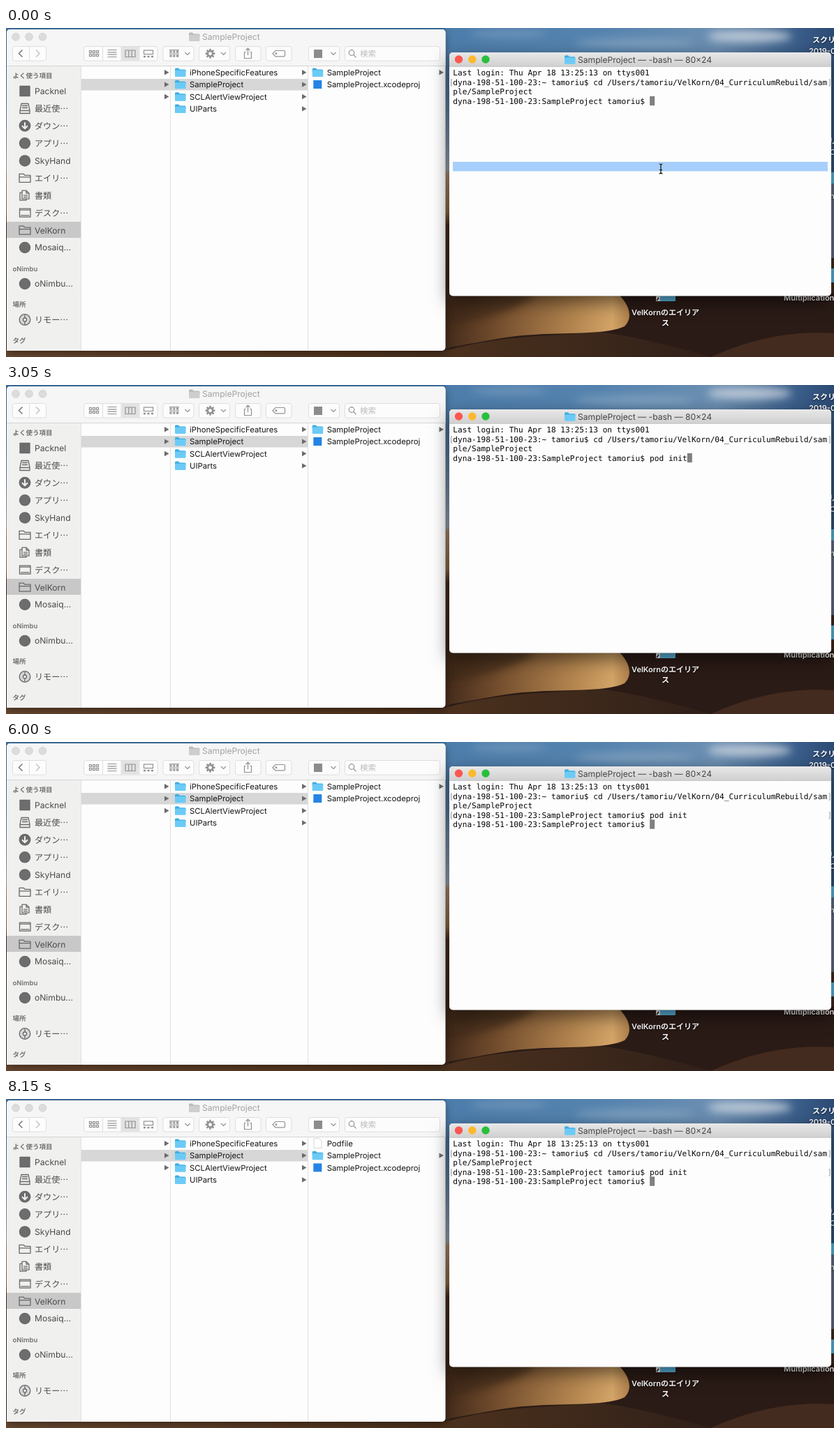
Animation, 1186 px wide and 472 px high, one loop 8.2 s. Source, as an HTML page:

```html
<!DOCTYPE html>
<html lang="ja">
<head>
<meta charset="utf-8">
<title>pod init</title>
<style>
html, body { margin: 0; width: 100%; height: 100%; overflow: hidden; background: #2b1b16; }
svg { display: block; width: 1186px; height: 472px; }
text { font-family: Inter, "Noto Sans CJK JP", "Noto Sans CJK", "DejaVu Sans", sans-serif;
  text-rendering: geometricPrecision; white-space: pre; }
.mono text { font-family: "DejaVu Sans Mono", monospace; font-size: 11.146px; fill: #050505; }
.side text { font-size: 12.1px; fill: #4b4b4b; }
.side .head { font-size: 9.5px; font-weight: 600; fill: #727272; }
.cols text { font-size: 11.3px; fill: #161616; }
.desk text { font-size: 11px; font-weight: 600; fill: #fff; filter: drop-shadow(0 1px 1px #000a); }
.icon { fill: none; stroke: #686868; stroke-width: 1.3; stroke-linejoin: round; }
.tool { fill: none; stroke: #929292; stroke-width: 1.2; }
</style>
</head>
<body>
<svg id="stage" viewBox="0 0 1186 472">
<defs>
  <linearGradient id="land" x2="0" y2="1">
    <stop offset="0" stop-color="#41709f"/><stop offset=".2" stop-color="#5c83aa"/>
    <stop offset=".43" stop-color="#a3b0bd"/><stop offset=".445" stop-color="#b59172"/>
    <stop offset=".56" stop-color="#9a7049"/><stop offset=".6" stop-color="#4a3020"/>
    <stop offset="1" stop-color="#38241a"/>
  </linearGradient>
  <linearGradient id="sky">
    <stop offset="0" stop-color="#4d7dab"/><stop offset=".4" stop-color="#5583ae"/>
    <stop offset=".7" stop-color="#6c8fb2"/><stop offset=".9" stop-color="#3b5f8b"/>
    <stop offset="1" stop-color="#2c4a73"/>
  </linearGradient>
  <linearGradient id="dune" x1="630" x2="895" gradientUnits="userSpaceOnUse">
    <stop offset="0" stop-color="#442b1b"/><stop offset=".3" stop-color="#76502f"/>
    <stop offset=".7" stop-color="#b58650"/><stop offset=".9" stop-color="#d3a467"/>
    <stop offset="1" stop-color="#ac7d49"/>
  </linearGradient>
  <linearGradient id="ground">
    <stop offset="0" stop-color="#6b4a32"/><stop offset=".5" stop-color="#55371f"/>
    <stop offset="1" stop-color="#302019"/>
  </linearGradient>
  <linearGradient id="bar" x2="0" y2="1">
    <stop offset="0" stop-color="#e8e8e8"/><stop offset="1" stop-color="#d0d0d0"/>
  </linearGradient>
  <filter id="soft" x="-50%" y="-100%" width="200%" height="300%"><feGaussianBlur stdDeviation="6"/></filter>
  <g id="folder">
    <path d="M0 1.5Q0 0 1.5 0H5L7 2H14Q15.5 2 15.5 3.5V6H0Z" fill="#3eaee2"/>
    <rect y="3.2" width="15.5" height="9.3" rx="1.2" fill="#6bcbf6"/>
  </g>
  <clipPath id="termClip"><rect x="635" y="35" width="547" height="349.5" rx="5"/></clipPath>
</defs>
</svg>
<script>
const stage = document.getElementById('stage');
const USER = 'tamoriu', HOST = 'dyna-198-51-100-23', TEAM = 'VelKorn';
const CHAR = 6.71, LINE = 13.5, ROW = 17.4;

const text = (x, y, s, attrs = '') => `<text x="${x}" y="${y}" ${attrs}>${s}</text>`;
const rect = (x, y, w, h, fill, attrs = '') =>
  `<rect x="${x}" y="${y}" width="${w}" height="${h}" fill="${fill}" ${attrs}/>`;
const dot = (x, y, r, fill, attrs = '') => `<circle cx="${x}" cy="${y}" r="${r}" fill="${fill}" ${attrs}/>`;
const path = (d, attrs = '') => `<path d="${d}" ${attrs}/>`;
const folder = (x, y, attrs = '') => `<use href="#folder" x="${x}" y="${y}" ${attrs}/>`;
const arrow = (x, y) => path(`M${x - 3} ${y - 3.7}L${x + 3.5} ${y}L${x - 3} ${y + 3.7}Z`, 'fill="#6b6b6b"');
const group = (cls, body, attrs = '') => `<g class="${cls}" ${attrs}>${body}</g>`;

function desktop() {
  return rect(0, 0, 1186, 472, 'url(#land)') +
    rect(630, 0, 556, 40, 'url(#sky)') +
    rect(1150, 40, 36, 180, '#34557f') + rect(1150, 220, 36, 110, '#63718a') +
    `<g filter="url(#soft)">
      <ellipse cx="1065" cy="12" rx="60" ry="9" fill="#d2dae2" opacity=".75"/>
      <ellipse cx="900" cy="22" rx="85" ry="7" fill="#9bb3c9" opacity=".5"/>
      <ellipse cx="720" cy="8" rx="55" ry="6" fill="#89a9c6" opacity=".45"/>
    </g>` +
    rect(635, 380, 551, 92, '#2b1b16') +
    path('M1010 472C1070 444 1130 434 1186 438V472Z', 'fill="#4c3022" opacity=".75"') +
    path('M0 463H630C710 440 790 442 850 436C900 442 960 458 1010 472H0Z', 'fill="url(#ground)"') +
    path('M600 380H875C891 394 900 414 886 428C858 441 800 436 740 441C700 445 660 455 600 464Z', 'fill="url(#dune)"') +
    path('M600 380H760C735 404 690 420 600 430Z', 'fill="#3b2518" opacity=".6" filter="url(#soft)"') +
    group('desk',
      rect(931, 376, 28, 16, '#5bb9e4', 'rx="1.5"') +
      path('M931 385h6v7h-6z', 'fill="#f3f3f3"') + path('M932 391l3-4', 'stroke="#111" stroke-width="1.3"') +
      rect(1182, 207, 4, 16, '#5bb9e4') + rect(1182, 345, 4, 20, '#5bb9e4') +
      text(944.5, 412, TEAM + 'のエイリア', 'text-anchor="middle"') +
      text(944.5, 427, 'ス', 'text-anchor="middle"') +
      text(1155, 21, 'スクリ') + text(1150, 36.5, '2019-04') + text(1114, 391, 'Multiplication') +
      text(1179, 166, 'リ') + text(1180, 182, 'C') + text(1180, 245, 'n'));
}

function toolbar() {
  const chevron = x => path(`M${x - 3.5} 35l3.5 3.5l3.5-3.5`);
  const box = (x, w) => rect(x, 26.5, w, 20.5, '#fcfcfc', 'rx="3" stroke="#dedede" stroke-width="1"');
  const grid = (x, y, cols, rows, s, gap) => Array.from({ length: cols * rows }, (_, i) =>
    rect(x + i % cols * gap, y + (i / cols | 0) * gap, s, s, 'none')).join('');
  const teeth = Array.from({ length: 8 }, (_, i) =>
    path('M292.5 29.8v3', `transform="rotate(${i * 45} 292.5 36.7)" stroke-width="2.6"`)).join('');
  return [[9.5, 48], [111.5, 105.5], [225, 44], [276.5, 44], [328.5, 36.5], [372.5, 36.5], [433.5, 44], [485.5, 136]]
      .map(b => box(...b)).join('') +
    rect(165.5, 27, 25, 19.5, '#e2e2e2') +
    path('M33.5 27v20M138.5 27v20M165 27v20M191 27v20', 'stroke="#dedede"') +
    group('tool',
      path('M23.5 31.5l-5 5l5 5', 'stroke="#777" stroke-width="1.5"') +
      path('M43 31.5l5 5l-5 5', 'stroke="#c4c4c4" stroke-width="1.5"') +
      grid(119.5, 32.5, 3, 2, 3, 5) +
      path('M145.5 31.5h13M145.5 34.8h13M145.5 38.2h13M145.5 41.5h13') +
      path('M171 32h14v9.5h-14zM175.7 32v9.5M180.3 32v9.5') +
      rect(197.5, 32, 13, 5.5, 'none') + path('M197 41h3M202.5 41h3M208 41h3', 'stroke-width="2.4"') +
      path('M234 31.5h14M234 37h14') + grid(235, 33, 3, 1, 2, 4.8) + grid(235, 39, 3, 1, 2, 4.8) +
      chevron(260) + chevron(311.5) + chevron(469) +
      teeth + dot(292.5, 36.7, 3.7, 'none', 'stroke-width="2.5"') +
      path('M343.5 34.5h-2v9h10v-9h-2M346.5 39v-10M343.5 32l3-3l3 3') +
      path('M382 36.7l4-4.2h12q1.5 0 1.5 1.5v5.4q0 1.5-1.5 1.5h-12z') + dot(387, 36.7, 0.8, '#929292') +
      dot(495, 35.5, 3.8, 'none') + path('M498 38.5l3.5 3.8')) +
    rect(441, 31, 12, 12, '#8c8c8c') +
    text(507, 41, '検索', 'font-size="11.5" fill="#bbb"');
}

function sidebar() {
  const solid = (y, round) => round ? dot(27, y, 7.6, '#6d6d6d') : rect(20, y - 7, 14, 14, '#6d6d6d');
  const folderIcon = y => path(`M19 ${y - 6}h6l2 2h8v10h-16zM19 ${y - 1.5}h16`);
  const items = [
    [90.5, 'Packnel', y => solid(y)],
    [115.5, '最近使⋯', y => path(`M20 ${y + 7}v-4l2-10h10l2 10v4zM20 ${y + 3}h14M23 ${y - 4}h8M23 ${y - 1}h8`)],
    [140.3, 'ダウン⋯', y => dot(27, y, 7.8, '#6d6d6d') + path(`M27 ${y - 5}v9M23 ${y}l4 4l4-4`, 'stroke="#f0f0f0" stroke-width="2"')],
    [165.3, 'アプリ⋯', y => solid(y, 1)],
    [190.4, 'SkyHand', y => solid(y, 1)],
    [215.3, 'エイリ⋯', folderIcon],
    [240.2, '書類', y => path(`M23 ${y - 7}h6l4 4v8h-10zM29 ${y - 7}v4h4M23 ${y - 4}h-3v11h9v-2M25 ${y}h6M25 ${y + 2.5}h6`)],
    [265.2, 'デスク⋯', y => path(`M19.5 ${y - 6}h15.5v12h-15.5zM19.5 ${y - 4}h15.5M21 ${y + 3.7}h12.5`)],
    [290.2, TEAM, folderIcon],
    [315, 'Mosaiq...', y => solid(y, 1)],
    [367, 'oNimbu...', y => solid(y, 1)],
    [418.5, 'リモー⋯', y => dot(27, y, 7.8, '#d6d6d6') + dot(27, y, 2.5, '#f0f0f0') + path(`M27 ${y - 7}v4M27 ${y + 3}v4`)]
  ];
  const heads = [[71.5, 'よく使う項目'], [349, 'oNimbu'], [400, '場所'], [451.5, 'タグ']];
  return rect(1, 55, 106, 408, '#f0f0ef') + rect(1, 278, 106, 23, '#c8c8c8') +
    group('side',
      items.map(([y, name, icon]) => group('icon', icon(y)) + text(41, y + 4.3, name)).join('') +
      heads.map(([y, name]) => text(9.5, y, name, 'class="head"')).join(''));
}

function entry(x, y, name) {
  return folder(x, y - 6.3) + text(x + 21, y + 4.2, name);
}

function finder() {
  const names = ['iPhoneSpecificFeatures', 'SampleProject', 'SCLAlertViewProject', 'UIParts'];
  const rowY = i => 63.7 + i * ROW;
  return group('', rect(1, 2, 628.5, 461, '#fdfdfd', 'rx="5"'), 'style="filter:drop-shadow(0 4px 6px #0006)"') +
    path('M1 55V7Q1 2 6 2H624.5Q629.5 2 629.5 7V55Z', 'fill="#f6f6f6"') +
    [14, 33, 52.5].map(x => dot(x, 12.7, 5.4, '#dcdcdc', 'stroke="#cbcbcb" stroke-width=".7"')).join('') +
    folder(262, 6.5, 'style="filter:grayscale(1)" opacity=".65"') +
    text(281, 17.2, 'SampleProject', 'font-size="12.1" fill="#a2a2a2"') +
    toolbar() + sidebar() +
    rect(107, 73, 325, 16.5, '#d7d7d7') +
    path('M1 54.5H629.5', 'stroke="#d5d5d5"') +
    path('M107.5 55V463M235.5 55V463M432.5 55V463', 'stroke="#e0e0e0"') +
    group('cols',
      [0, 1, 2].map(i => arrow(230, rowY(i))).join('') +
      names.map((n, i) => entry(242, rowY(i), n) + arrow(427, rowY(i))).join('') +
      group('', path('M441 56.5h7.5l3.5 3.5v10.5h-11z', 'fill="#fff" stroke="#d0d0d0" stroke-width=".8"') +
        text(459.7, 68, 'Podfile'), 'id="podfile"') +
      group('', entry(438.7, 63.7, 'SampleProject') + arrow(623.5, 63.7) +
        rect(440.3, 75, 12, 12, '#2484e4') + text(459.7, 85.3, 'SampleProject.xcodeproj'), 'id="files"'));
}

function terminal() {
  const prompt = `${HOST}:SampleProject ${USER}$ `;
  const line = (n, s, attrs) => text(640.3, 68 + n * LINE, s, attrs);
  const marks = (n, attrs) => group('', text(634.4, 68 + n * LINE, '[', 'style="fill:#999"') +
    text(1176.6, 68 + n * LINE, ']', 'style="fill:#999"'), attrs);
  return group('', rect(635, 35, 547, 349.5, '#fdfdfd', 'rx="5"'),
      'style="filter:drop-shadow(0 0 .6px #0008) drop-shadow(0 9px 13px #0008)"') +
    group('', rect(635, 35, 547, 20, 'url(#bar)') + path('M635 55.3H1182', 'stroke="#b8b8b8" stroke-width=".8"') +
      rect(640, 192, 537, 13.5, '#a7cffc', 'id="select"'), 'clip-path="url(#termClip)"') +
    dot(648.5, 45, 5.7, '#fc5650') + dot(667.8, 45, 5.7, '#fdb92d') + dot(687, 45, 5.7, '#28bf3c') +
    dot(648.5, 45, 2, '#7a0c08', 'id="busy"') +
    group('', folder(-19, 39.2, 'id="proxy"') +
      text(0, 49.5, '', 'id="title" font-size="12.1" fill="#454545"'), 'id="heading"') +
    group('mono',
      rect(0, 0, 7, 13.3, '#808080', 'id="cursor"') +
      line(0, 'Last login: Thu Apr 18 13:25:13 on ttys001') +
      line(1, `${HOST}:~ ${USER}$ cd /Users/${USER}/${TEAM}/04_CurriculumRebuild/sam`) +
      line(2, 'ple/SampleProject') + line(3, prompt) +
      text(640.3 + prompt.length * CHAR, 68 + 3 * LINE, '', 'id="typed"') +
      line(4, prompt, 'id="again"') + marks(1) + marks(3, 'id="marks"')) +
    group('', path('M935.5 195q2.5 0 2.5 2q0-2 2.5-2M935.5 209q2.5 0 2.5-2q0 2 2.5 2M938 197v10M936 203.5h4',
      'fill="none" stroke="#111" stroke-width="1.2"'), 'id="beam"');
}

stage.insertAdjacentHTML('beforeend', desktop() + finder() + terminal());

const el = {};
stage.querySelectorAll('g[id], text[id], rect[id], circle[id], use[id]').forEach(e => el[e.id] = e);
const show = (id, on) => el[id].setAttribute('visibility', on ? 'visible' : 'hidden');

const LOOP = 8200, COMMAND = 'pod init';
const TYPE = 750, KEY = 225, ENTER = 3100, BUILD = 4600, DONE = 6000, INSERT = 6650, SLIDE = 280;

function draw(t) {
  const count = t < TYPE ? 0 : Math.min(COMMAND.length, 1 + Math.floor((t - TYPE) / KEY));
  const entered = t >= ENTER, done = t >= DONE, running = entered && !done;
  const [titleX, process] = !running ? [819, '-bash'] : t < BUILD ? [814, 'pod init'] : [776, 'xcodebuild ◂ pod init'];
  el.typed.textContent = COMMAND.slice(0, count);
  el.title.textContent = `SampleProject — ${process} — 80×24`;
  el.heading.setAttribute('transform', `translate(${titleX} 0)`);
  el.proxy.setAttribute('opacity', running ? 0.5 : 1);
  show('busy', running);
  show('marks', entered);
  show('again', done);
  show('select', !count);
  show('beam', !count);
  const col = running ? 0 : done ? 42 : 42 + count;
  el.cursor.setAttribute('x', 640.3 + col * CHAR);
  el.cursor.setAttribute('y', 57.4 + (entered ? 4 : 3) * LINE);
  const p = Math.min(1, Math.max(0, (t - INSERT) / SLIDE));
  const ease = (1 - Math.cos(Math.PI * p)) / 2;
  el.files.setAttribute('transform', `translate(0 ${ease * ROW})`);
  el.podfile.setAttribute('opacity', p * ease);
}

const start = performance.now();
function frame() {
  draw((performance.now() - start) % LOOP);
  requestAnimationFrame(frame);
}
frame();
</script>
</body>
</html>
```
